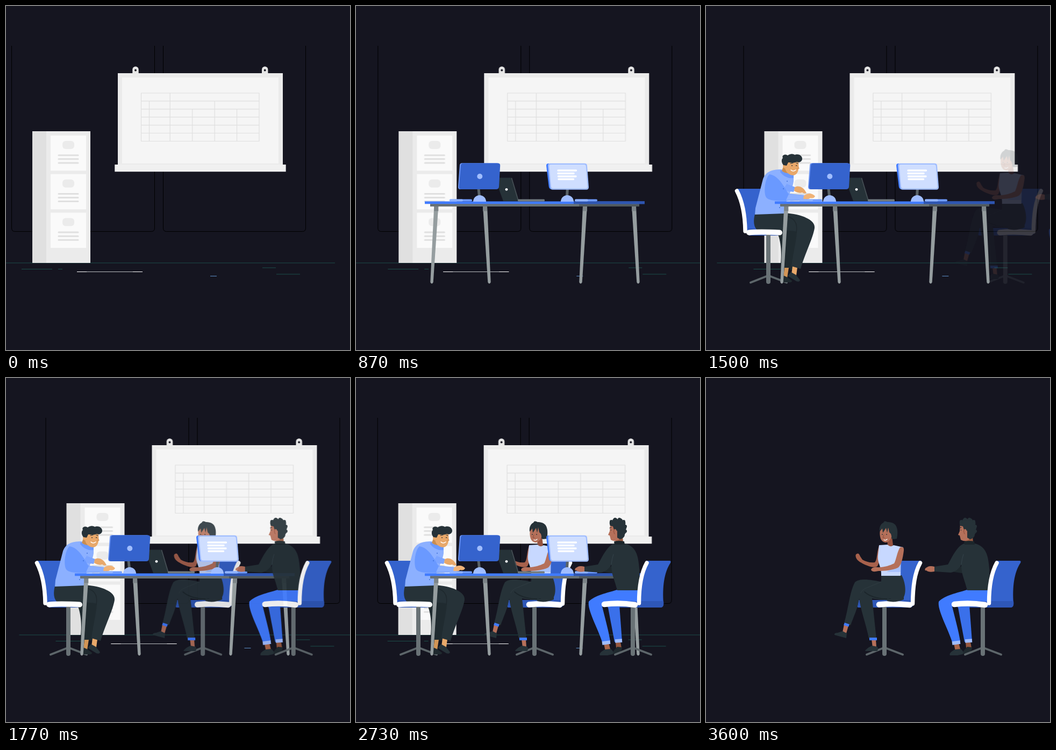
Write an HTML page with a canvas that moves like this. It is 640 px wide and 640 px high and loops after 3.63 s.

```html
<!DOCTYPE html>
<html lang="en">
<head>
<meta charset="utf-8">
<title>Office</title>
<style>
html, body { margin: 0; width: 100%; height: 100%; overflow: hidden; background: #151520; }
canvas { display: block; width: 640px; height: 640px; }
</style>
</head>
<body>
<canvas id="stage" width="640" height="640"></canvas>
<script>
const LOOP = 3630, SWAY = 3590, CUT = 3585, SIZE = 640;
const BG = '#151520', DARK = '#263238', BLUE = '#407bff', DEEP = '#3563cd', PALE = '#a0bdff',
  GREY = '#697276', LEG = '#959d9f', TEAL = '#1d4f4a';
const stage = document.getElementById('stage').getContext('2d');
let c = stage;

const fill = (d, color) => { c.fillStyle = color; c.fill(new Path2D(d)); };
const line = (d, color, width = 1, cap = 'round') => {
  c.strokeStyle = color; c.lineWidth = width; c.lineCap = cap; c.lineJoin = 'round';
  c.stroke(new Path2D(d));
};
const box = (x, y, w, h, color, r = 0) => {
  c.fillStyle = color; c.beginPath(); c.roundRect(x, y, w, h, r); c.fill();
};
const dot = (x, y, r, color, ry = r, turn = 0) => {
  c.fillStyle = color; c.beginPath(); c.ellipse(x, y, r, ry, turn, 0, 7); c.fill();
};
const clamp = v => Math.max(0, Math.min(1, v));
const ease = p => (1 - Math.cos(Math.PI * clamp(p))) / 2;

// Each group is painted once so that it can fade as a whole.
function layer(paint) {
  const canvas = document.createElement('canvas');
  canvas.width = canvas.height = SIZE;
  c = canvas.getContext('2d');
  paint();
  c = stage;
  return canvas;
}

function floor() {
  const dash = (x1, x2, y, color) => box(x1, y, x2 - x1, 1, color);
  dash(-39, 612, 477.6, '#1c4d49');
  dash(29, 86, 489, TEAL);
  dash(97, 105, 489, TEAL);
  dash(132, 254, 494, '#b9bcc0');
  dash(132, 150, 494, '#fff');
  dash(236, 254, 494, '#fff');
  dash(380, 392, 502, '#5d8fc8');
  dash(477, 502, 486.5, TEAL);
  dash(503, 547, 498.5, TEAL);
}

function windows() {
  for (const [x, r] of [[10.5, 276.5], [292.5, 557.5]])
    line(`M${x} 74V413Q${x} 419.5 ${x + 6} 419.5H${r - 6}Q${r} 419.5 ${r} 413V74`, '#000', 1, 'butt');
}

function cabinet() {
  box(49, 233, 108, 245, '#ebebeb');
  box(49, 233, 26, 245, '#e0e0e0');
  for (let i = 0; i < 3; i++) {
    const y = 241 + i * 71.7;
    box(83, y, 66, 65.5, '#fafafa');
    box(105, y + 10, 22, 15, '#ebebeb', 6);
    for (let k = 0; k < 3; k++) box(96.5, y + 35.2 + k * 7.1, 39, 3, '#e0e0e0', 1.5);
  }
}

function board() {
  for (const x of [241, 481.7]) {
    box(x - 5.7, 112.5, 11.4, 14, '#e6e6e6', [5.7, 5.7, 0, 0]);
    dot(x, 119.5, 1.9, BG);
  }
  box(208, 125, 307, 171, '#ebebeb');
  box(216, 133, 291, 160, '#f5f5f5');
  box(202.3, 295, 318.4, 13.3, '#f0f0f0');
  let grid = 'M251.5 162H471V251.5H251.5Z';
  for (let i = 1; i < 6; i++) grid += `M251.5 ${162 + i * 14.9}H471`;
  for (const [x, y] of [[305.2, 162], [266.5, 177], [388.2, 177], [346.7, 192], [429.5, 192]])
    grid += `M${x} ${y}V251.5`;
  line(grid, '#dfdfdf', 1.2);
}

function desk() {
  for (const [top, foot] of [[149.3, 141], [240, 248], [426, 418], [517, 525]]) {
    fill(`M${top - 4} 372H${top + 4}L${foot + 2.7} 514Q${foot} 519 ${foot - 2.7} 514Z`, LEG);
    box(top - 4, 373, 8, 8.5, '#7c8488');
  }
  box(138, 368, 389, 5, '#687175');
  box(415, 368, 112, 5, '#50595d');
  box(128, 363.5, 409, 4.7, BLUE);
  box(405, 363.5, 132, 4.7, '#2e55b0');
  fill('M261 319.5H288L302 363H274L259 322Q258.500 319.500 261 319.500Z', DARK);
  line('M289.5 320.500L302 362', '#465056', 1.8);
  dot(280, 341.3, 2.4, '#fff');
  box(301, 359.5, 50, 4, '#727b7f', 1.5);
}

function keyboard(x) {
  box(x, 359.6, 42, 4, '#6f9bff', 2);
  box(x, 359.6, 25, 4, '#8fb2ff', 2);
}

function monitors() {
  const dome = x => fill(`M${x - 12} 364A12 12 0 0 1 ${x + 12} 364Z`, PALE);
  line('M227.500 335L229.500 354', '#596267', 5, 'butt');
  dome(230);
  fill('M197 292.300H262Q266 292.300 265.500 297L262 337Q261 341 257 341H194Q189.500 341 190 336L193 296Q193.500 292.300 197 292.300Z', '#6f97f5');
  fill('M200 292.500H264Q268.500 292.500 268.200 297L266 336Q265.500 341 261 341H196Q191.300 341 191.700 336L195 296.500Q195.500 292.500 200 292.500Z', DEEP);
  dot(230.300, 317, 5, PALE);
  keyboard(174);

  line('M393.500 339L392.500 354', '#596267', 5, 'butt');
  dome(393);
  fill('M358 293H420L425 341H364Q359.500 341 358.700 336L354 297Q354 293 358 293Z', BLUE);
  fill('M361 292.800H425Q429.500 292.800 430 297L433 337Q433 341.700 428.500 341.700H366Q361.500 341.700 361 337L357 297Q357 292.800 361 292.800Z', PALE);
  fill('M362.500 295H424.500Q427.500 295 427.800 298L430.700 336Q430.700 339.500 427.500 339.500H367Q363.500 339.500 363 336L359.500 298Q359.500 295 362.500 295Z', '#cfdeff');
  line('M376 306H409.500M376 311.500H405M376.500 317H409M377 322.300H404.500', '#fff', 3.4);
  keyboard(407);
}

function chairBase(x) {
  line(`M${x - 33} 514.500L${x} 501.500L${x + 34} 514.500`, '#5d666a', 4);
  box(x - 4, 424, 8, 93, GREY, 4);
}

function leftMan() {
  fill('M57 340H112L126 420H76C77 390 70 362 57 340Z', DEEP);
  fill('M78 414H180V424Q180 427 176 427H80Z', '#2e57b8');
  chairBase(116);
  // far leg
  fill('M128 392C158 391 173 404 171 424L163 488L138 488C142 460 140 432 128 412Z', '#202b30');
  fill('M146 487H154L151 506H144Z', '#d39556');
  fill('M143 501L150 504L160 511Q160 515 154 514H138Z', '#1f292e');
  // near leg
  fill('M161 484L170 486L168 501L159 499Z', '#e8a86a');
  fill('M158 495L167 500L175 510Q174 514 168 512L152 502Z', DARK);
  fill('M91 387L146 385C178 387 204 398 202 413C199 432 184 461 176 489L159 484C162 460 168 438 169 420C150 415 120 419 96 417C88 412 88 398 91 387Z', DARK);
  line('M149 391C164 394 171 404 168 421', '#1f292e', 1.500);
  line('M57.500 344C67 362 72.500 388 73 419', '#fff', 7.500);
  line('M80 421.500C95 420 116 420.500 137 421.500', '#fff', 10);
  // torso and arms
  fill('M140 304C121 304 111 309 106 322L92 376L91 388L145 386C145 364 160 347 163 326V308Z', '#8cb0ff');
  fill('M150 331L166 337L163 346L143 343Z', '#7ba4ff');
  fill('M165 337C172 333 180 337 184 343L187 348Q183 350 179 347C173 349 168 346 164 344Z', '#e8a86a');
  fill('M118 313C109 322 107 348 112 356C118 364 138 363 182 361.500L184 352L153 349L147 339C139 326 131 315 118 313Z', '#6a99ff');
  fill('M154 350L185 352L183 361H149Z', '#8cb0ff');
  fill('M182 353C189 347 198 348 203 354Q200 359 194 357C189 361 185 360 181 359Z', '#f0b377');
  for (const [x, y] of [[151, 326], [144, 340], [137, 375]]) dot(x, y, 1, '#3f6fd8');
  // head
  fill('M144 298L164 308L162 319Q150 319 141 307Z', '#c98d50');
  fill('M139 305Q150 315 163 309L163 320Q148 322 138 309Z', '#6a99ff');
  fill('M147 287L171 285C174 299 173 313 163 315C153 315 147 307 147 300Z', '#e8a86a');
  dot(147, 297, 4, '#e8a86a', 5);
  line('M169 296L173 302L169 303', '#d18f52', 1.200);
  line('M158 305Q162 309 167 305', '#fff', 1.500);
  line('M157 293L162 292M168 292L171 293', DARK, 1.100);
  dot(160, 297, .9, DARK); dot(168, 297, .9, DARK);
  fill('M144 296C139 290 141 284 143 283C140 276 149 275 152 278C157 274 163 275 165 277C171 274 179 278 179 284C179 290 173 292 169 290C163 293 156 291 153 291L150 297Z', DARK);
}

function woman() {
  fill('M352 340H401C389 363 386 390 386 420H346Z', DEEP);
  fill('M284 413H385V424Q383 427 378 427H284Q280 427 282 423Z', '#2e57b8');
  chairBase(332);
  line('M398.500 344C388 363 385 388 384.500 420', '#fff', 7.500);
  // far arm
  fill('M322 312C317 326 319 338 314 343C305 344 298 342 291 338L287 332Q284 325 281 327Q277 328 279 334C282 341 288 343 293 346C303 351 315 354 319 350C324 341 325 326 325 314Z', '#a7614c');
  // legs
  fill('M308 486H316L317 501H310Z', '#b5705a');
  fill('M309 498L319 500Q321 507 318 508H296Q298 503 309 498Z', DARK);
  fill('M257 458L265 461L261 475L254 473Z', '#b5705a');
  fill('M254 471L262 475L261 484L239 478Q238 474 245 474Z', DARK);
  fill('M326 367H364C371 380 374 402 366 410C352 416 326 413 309 410L317 485H303C298 458 287 430 285 410C282 430 274 445 269 460L257 456C265 429 267 399 277 380C286 371 310 376 326 379Z', DARK);
  line('M288 400C291 391 300 391 326 379', '#303d43', 1);
  line('M295 398C306 408 326 412 343 411', '#1c262b', 1.800);
  line('M257 457.500L266 460.500', BLUE, 5, 'butt');
  line('M304 485.500H318', BLUE, 5, 'butt');
  line('M322 421.500C342 419.500 360 420 379 422', '#fff', 10.500);
  fill('M337 410C350 412 362 414 368 406L368 412Q352 419 337 415Z', DARK);
  // torso
  fill('M322 311L338 310Q343 315 349 311L367 315C361 330 363 350 362 368H326C327 350 318 344 320 329Z', '#c7d8ff');
  fill('M362 344L362 361H336Z', '#a9c3ff');
  fill('M361 315Q369 313 368 321C366 337 363 349 357 353C346 358 332 359 321 359Q309 362 307 357Q308 352 316 352C331 353 341 349 350 345C354 338 355 325 361 315Z', '#b5705a');
  // head
  fill('M336 298L346 295L348 311Q343 316 338 310Z', '#965340');
  fill('M344 269C356 270 358 285 355 299Q346 301 345 298L340 272Z', DARK);
  fill('M324 280L346 278C349 293 343 305 334 306C325 305 322 296 324 280Z', '#b5705a');
  fill('M323 286C321 272 331 266 338 268C350 267 355 278 352 297L346 298L344 290L341 287L339 278L337 288L335 279L329 288L328 280Z', DARK);
  line('M331 269Q332 266 336 268', DARK, 1.500);
  line('M331 292L329 297L332 297', '#8d4a39', 1);
  line('M331 301Q334 303 337 300', '#fff', 1.200);
  dot(328, 291, .9, DARK); dot(336, 291, .9, DARK);
}

function rightMan() {
  fill('M540 340H583Q587 340 585 344C573 362 570 390 572 418Q573 427 566 427H522Z', DEEP);
  fill('M470 415H572Q574 427 566 427H468Z', '#2e57b8');
  // legs
  fill('M483 491H492L494 502H484Z', '#96583f');
  fill('M486 500L495 501Q496 508 488 510L477 514Q476 510 486 500Z', '#1f292e');
  fill('M468 422H490L495 490L481 491Z', '#3a70ea');
  line('M482 489.500L495 488.500', PALE, 6.500, 'butt');
  chairBase(515);
  fill('M461 494L470 492L474 508H464Z', '#a9654b');
  fill('M463 505L474 504Q481 510 477 514L468 516H454Q451 512 463 505Z', DARK);
  fill('M486 394L524 394V416C498 414 476 416 458 425C463 446 470 470 473 490L459 494C450 465 430 432 433 416C445 404 467 400 486 394Z', BLUE);
  line('M458 493.500L473 491.500', PALE, 6.500, 'butt');
  // arms and torso
  fill('M463 352L478 350L482 364L456 360Z', '#1f292e');
  fill('M425 351Q417 349 413 351L408 354Q406 359 410 358Q414 362 425 360Z', '#b5705a');
  fill('M480 308C503 304 521 312 525 338C529 362 528 380 524 395H486C481 374 475 366 475 347C471 355 463 361 455 362L425 360V351L450 347C456 337 466 313 480 308Z', DARK);
  line('M475 347Q476 336 479 328', '#35434a', 1);
  line('M541 344C531 362 526.500 388 526.500 419', '#fff', 7.500);
  line('M462 421C482 418.500 503 419.500 519 422', '#fff', 10.500);
  // head
  fill('M481 292L496 294L497 306H483Z', '#96583f');
  fill('M473 271L489 269L490 300Q483 306 474 301L472 293L469 292L472 285Z', '#b5705a');
  fill('M480 304Q490 302 499 304L500 310H481Z', '#1c262b');
  fill('M473 275C470 267 473 264 477 265C479 259 485 260 487 263C491 259 496 262 496 265C502 265 502 270 501 273C505 276 503 280 502 282C505 286 501 289 500 291C500 296 496 299 491 300L486 297V284L481 286L478 276Z', DARK);
  for (const [x, y] of [[475, 267], [482, 263], [490, 263], [498, 267], [501, 276], [501, 285]]) dot(x, y, 3, DARK);
  dot(482, 286, 3, '#b5705a', 5);
  line('M481 282Q478 284 481 290', '#8d4a39', 1);
  line('M472 279L475 278', DARK, 1.200);
  dot(474.500, 283, .8, DARK);
}

const art = {
  scenery: layer(() => { windows(); cabinet(); board(); }),
  desk: layer(desk), monitors: layer(monitors),
  leftMan: layer(leftMan), woman: layer(woman), rightMan: layer(rightMan)
};

function place(image, shown, dx = 0) {
  if (shown <= 0) return;
  stage.globalAlpha = shown;
  stage.drawImage(image, dx, 0);
  stage.globalAlpha = 1;
}

function slideIn(image, t, start, distance) {
  const p = ease((t - start) / 540);
  place(image, p, distance * (1 - p));
}

function draw() {
  const t = performance.now() % LOOP, whole = t < CUT;
  stage.fillStyle = BG;
  stage.fillRect(0, 0, SIZE, SIZE);
  if (whole) {
    const sway = 31.75 * (1 - Math.cos(2 * Math.PI * t / SWAY));
    stage.save();
    stage.translate(sway, 0);
    floor();
    stage.restore();
    place(art.scenery, 1, sway);
    slideIn(art.leftMan, t, 810, -270);
  }
  slideIn(art.woman, t, 1356, 270);
  if (whole) {
    place(art.desk, ease((t - 60) / 360));
    place(art.monitors, ease((t - 320) / 360));
  }
  slideIn(art.rightMan, t, 1325, 270);
  requestAnimationFrame(draw);
}
draw();
</script>
</body>
</html>
```
